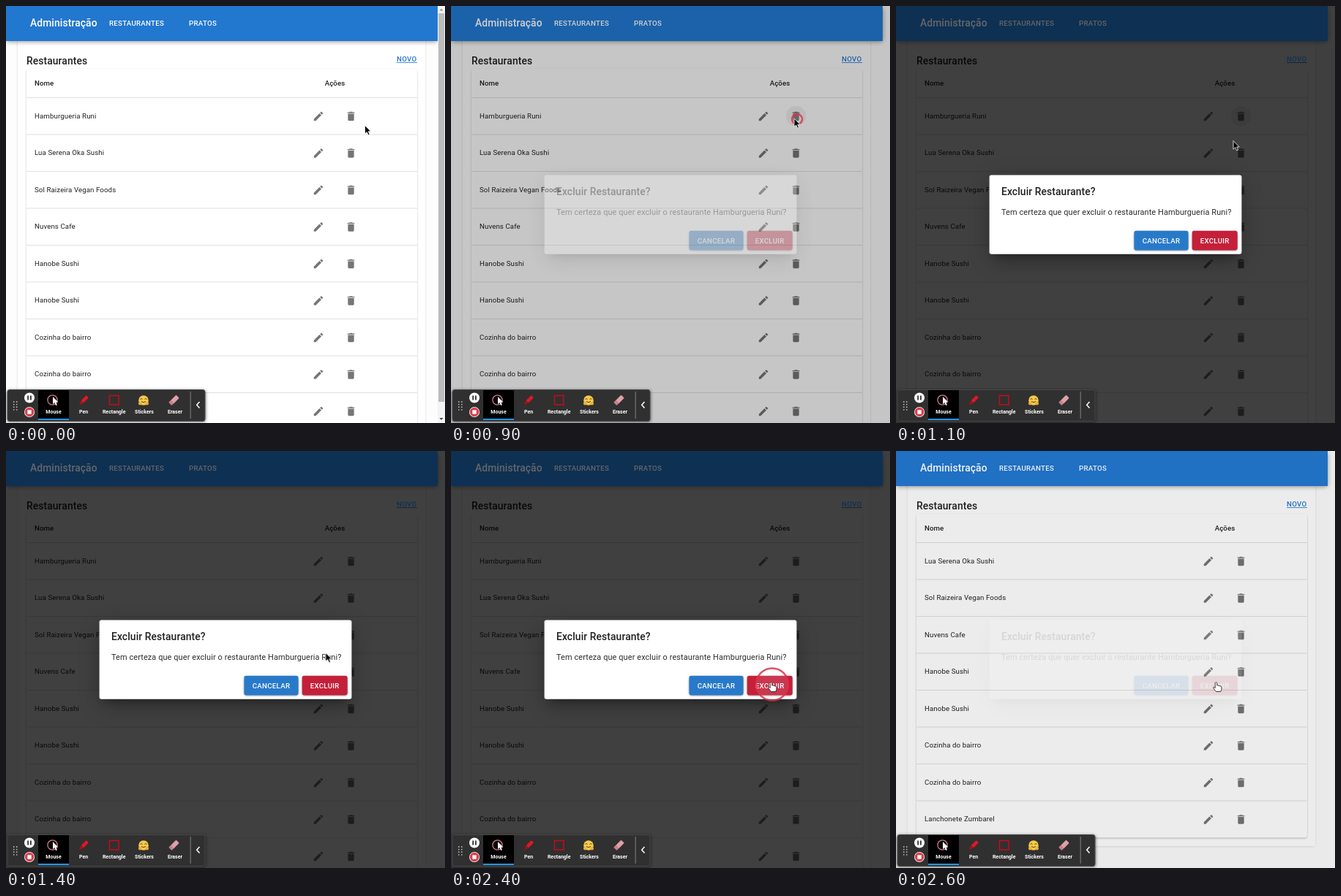
An HTML page for the animation above (2.7 s loop, 600x571 px).

```html
<!DOCTYPE html>
<html lang="pt">
<head>
<meta charset="utf-8">
<style>
html, body { margin: 0; width: 100%; height: 100%; overflow: hidden; background: #fff; }
svg { display: block; font: 9.69px Roboto, sans-serif; letter-spacing: .0107em; }
text { fill: #212121; white-space: pre; }
.medium { font-weight: 500; }
.title { font-size: 13.84px; font-weight: 500; letter-spacing: .0075em; }
.body { font-size: 10.95px; letter-spacing: .0085em; fill: #2c2c2c; }
.button { font-weight: 500; letter-spacing: .0286em; }
.tool { font-size: 7px; font-weight: 700; letter-spacing: 0; text-anchor: middle; }
.white { fill: #fff; }
.blue { fill: #2277cf; }
.mid { text-anchor: middle; }
.icon { fill: #757575; }
</style>
</head>
<body>
<svg id="stage" width="600" height="571" viewBox="0 0 600 571"></svg>
<script>
const LOOP = 2700, STEP = 100, ROW = 50.5, TOP = 125.5;
const BLUE = '#2277cf', RED = '#dc3248';
const names = ['Hamburgueria Runi', 'Lua Serena Oka Sushi', 'Sol Raizeira Vegan Foods', 'Nuvens Cafe',
  'Hanobe Sushi', 'Hanobe Sushi', 'Cozinha do bairro', 'Cozinha do bairro', 'Lanchonete Zumbarel'];
const PENCIL = 'M3 17.25V21h3.75L17.81 9.94l-3.75-3.75L3 17.25zM20.71 7.04c.39-.39.39-1.02 0-1.41l-2.34-2.34c-.39-.39-1.02-.39-1.41 0l-1.83 1.83 3.75 3.75 1.83-1.83z';
const TRASH = 'M6 19c0 1.1.9 2 2 2h8c1.1 0 2-.9 2-2V7H6v12zM19 4h-3.5l-1-1h-5l-1 1H5v2h14V4z';

const text = (x, y, s, cls = '') => `<text x="${x}" y="${y}" class="${cls}">${s}</text>`;
const rect = (x, y, w, h, fill, extra = '') =>
  `<rect x="${x}" y="${y}" width="${w}" height="${h}" fill="${fill}" ${extra}/>`;
const circle = (x, y, r, fill, extra = '') => `<circle cx="${x}" cy="${y}" r="${r}" fill="${fill}" ${extra}/>`;
const path = (d, extra) => `<path d="${d}" ${extra}/>`;
const shadow = (x, y, w, h, blur, alpha) =>
  rect(x, y, w, h, '#000', `rx="4" opacity="${alpha}" style="filter:blur(${blur}px)"`);
const icon = (x, y, d) => path(d, `class="icon" transform="translate(${x} ${y}) scale(.692) translate(-12 -12)"`);

function table(list) {
  const bottom = TOP + list.length * ROW;
  const rows = list.map((name, i) => {
    const y = TOP + i * ROW + 25;
    return text(39, y + 3, name) + icon(427, y + .5, PENCIL) + icon(471.5, y + .5, TRASH) +
      rect(28, y + 25, 534, 1, '#e0e0e0');
  }).join('');
  return shadow(16, 40, 557, bottom - 28, 1.6, .15) + rect(16, 40, 557, bottom - 28.5, '#fff') +
    shadow(28, 87, 534, bottom - 86, 1.2, .25) + rect(28, 86, 534, bottom - 86, '#fff', 'rx="3"') +
    rect(28, TOP - .5, 534, 1, '#e0e0e0') +
    text(39, 109, 'Nome', 'medium') + text(449.5, 109, 'Ações', 'medium mid') + rows;
}

const page = rect(0, 0, 600, 571, '#fdfdfd') +
  `<g id="full">${table(names)}</g><g id="short">${table(names.slice(1))}</g>` +
  text(28, 80, 'Restaurantes', 'title') + rect(534, 77, 28, .8, BLUE) +
  circle(471.5, 150.8, 13.8, '#000', 'id="hover" opacity=".06"') +
  shadow(0, 2, 590, 47, 3, .4) +
  `<g id="scrollbar">${rect(590, 0, 10, 571, '#f3f3f3')}${rect(591, 10, 8, 532, '#bcbcbc')}
    ${path('M592.5 6.5h5l-2.5-3z', 'fill="#999"')}${path('M592.5 564h5l-2.5 3z', 'fill="#444"')}</g>`;

// The blue parts dim less than the page, so they sit above the backdrop
const header = `<g id="header">${rect(0, 0, 590, 48, BLUE)}
  ${text(33, 28, 'Administração', 'title white')}
  ${text(141, 27, 'RESTAURANTES', 'button white')}${text(250, 27, 'PRATOS', 'button white')}
  ${text(534, 76, 'NOVO', 'button blue')}</g>`;

const action = (x, w, label, fill) => shadow(x, 309.5, w, 25.5, 1.5, .4) +
  rect(x, 307.8, w, 26.6, fill, 'rx="2.8"') + text(x + w / 2, 324.5, label, 'button white mid');

const dialog = `<g id="dialog">
  ${shadow(130, 240, 340, 108, 16, .3)}${shadow(134, 244, 332, 98, 6, .3)}
  ${rect(127.6, 231.6, 344.8, 108.2, '#fff', 'rx="2.8"')}
  ${text(144, 258.5, 'Excluir Restaurante?', 'title')}
  ${text(144, 286.3, `Tem certeza que quer excluir o restaurante ${names[0]}?`, 'body')}
  ${action(325.4, 74.2, 'CANCELAR', '#287ac9')}${action(404.7, 62, 'EXCLUIR', '#c4203a')}</g>`;

const grip = [0, 1, 2, 3].map(i => circle(10.7, 542 + i * 3.6, .9, '#bbb') + circle(14.7, 542 + i * 3.6, .9, '#bbb')).join('');
const labels = [[65, 'Mouse'], [106, 'Pen'], [147.7, 'Rectangle'], [189, 'Stickers'], [231, 'Eraser']]
  .map(([x, s]) => text(x, 557.6, s, 'tool white')).join('');
const ARROW = 'M0 0V11.5L2.7 9l1.9 4.2 1.9-.8L4.7 8.3H8.2Z';
const HAND = 'M-1.3 1Q0-1 1.3 1V4.4q1.6-.5 2.1.6 1.5-.5 2.1.6 1.7-.2 1.9 1.1V10L6.2 13H0L-3.8 8.2q-.3-1.6 1.1-1.3L-1.3 8Z';

const toolbar = shadow(1, 526, 272, 44, 2, .5) +
  rect(2, 525.5, 270, 43, '#303030', 'rx="3" stroke="#484848"') + grip +
  circle(32, 536.5, 7, '#fff') + rect(29.2, 533.5, 1.8, 6, '#333') + rect(33, 533.5, 1.8, 6, '#333') +
  circle(32, 556, 7, '#fff') + circle(32, 556, 6.2, '#d9404a') + rect(29.3, 553.3, 5.4, 5.4, '#fff') +
  rect(44, 526, 42, 41, '#000') + rect(44, 565, 42, 2, '#2196f3') +
  circle(63.5, 539.5, 6.6, 'none', 'stroke="#d87a86" stroke-width="1.3"') +
  path(ARROW, 'fill="#fff" transform="translate(64 535) scale(.9)"') +
  `<g transform="translate(106 540) rotate(45)">${rect(-2.3, -7.5, 4.6, 10, '#e01828', 'rx="1"')}
    ${path('M-2.3 3h4.6L.8 7.5h-1.6z', 'fill="#b50d0d"')}</g>` +
  rect(141.5, 533.5, 12.5, 12.5, 'none', 'stroke="#c00d18" stroke-width="1.6"') +
  circle(188, 540, 6.8, '#f3cb4c') +
  path('M183.5 538.5q1.5-2 3 0M189.5 538.5q1.5-2 3 0M185 541.5q3 2.5 6 0', 'fill="none" stroke="#6b3d10"') +
  circle(183.3, 544.3, 2.3, '#eeb040') + circle(192.7, 544.3, 2.3, '#eeb040') +
  `<g transform="translate(229.3 540) rotate(45)">${rect(-3, -7.5, 6, 11, '#dfa0a8', 'rx="1"')}
    ${rect(-3, 2.5, 6, 4.5, '#c98088', 'rx="1"')}</g>` +
  labels + rect(251.7, 528, .9, 37, '#8a8a8a') +
  path('M264.5 542l-3.8 4.3 3.8 4.3', 'fill="none" stroke="#fff" stroke-width="1.5"');

const $ = id => document.getElementById(id);
$('stage').innerHTML = page + rect(0, 0, 600, 571, '#000', 'id="backdrop"') + header + dialog + toolbar +
  circle(439, 319, 22, 'rgba(255,255,255,.1)', `id="ring" stroke="${RED}" stroke-width="2.4" stroke-opacity=".85"`) +
  `<g id="cursor">${path(ARROW, 'id="arrow" fill="#000" stroke="#fff" stroke-width=".8"')}
    ${path(HAND, 'id="hand" fill="#fff" stroke="#222" stroke-width=".9"')}</g>`;

// Piecewise linear value at time t through [time, value] points
function at(points, t) {
  const i = points.findIndex(p => p[0] > t);
  if (i === 0) return points[0][1];
  if (i < 0) return points[points.length - 1][1];
  const [t0, v0] = points[i - 1], [t1, v1] = points[i];
  return v0 + (v1 - v0) * (t - t0) / (t1 - t0);
}
const cursorX = [[0, 490.5], [450, 474], [850, 474], [900, 469], [1000, 469], [1400, 437], [1700, 437.5]];
const cursorY = [[0, 163.5], [450, 152.5], [850, 152.5], [900, 154], [1000, 154], [1400, 276.5], [1700, 316.5]];
const fade = [[800, 0], [900, .3], [1000, .85], [1100, 1], [2400, 1], [2500, .63], [2600, .1]];
const clicks = [[800, 473, 155], [2400, 439, 319.5]];

const set = (id, name, value) => $(id).setAttribute(name, value);
const show = (id, on) => set(id, 'visibility', on ? 'visible' : 'hidden');

function draw() {
  const t = Math.floor(performance.now() % LOOP / STEP) * STEP;
  const open = at(fade, t), removed = t >= 2600;
  show('full', !removed);
  show('short', removed);
  show('scrollbar', t < 900);
  show('hover', t >= 300 && t < 1200);
  set('backdrop', 'opacity', .75 * open);
  $('header').style.filter = `brightness(${1 - .6 * open})`;
  set('dialog', 'opacity', open);

  const hand = t >= 300 && t < 900 || t >= 1700;
  show('hand', hand);
  show('arrow', !hand);
  set('cursor', 'transform', `translate(${at(cursorX, t)} ${at(cursorY, t)})`);

  const click = clicks.find(([start]) => t >= start && t < start + 200);
  show('ring', click);
  if (click) {
    set('ring', 'cx', click[1]);
    set('ring', 'cy', click[2]);
    set('ring', 'r', at([[0, 22], [100, 7]], t - click[0]));
  }
  requestAnimationFrame(draw);
}
draw();
</script>
</body>
</html>
```
